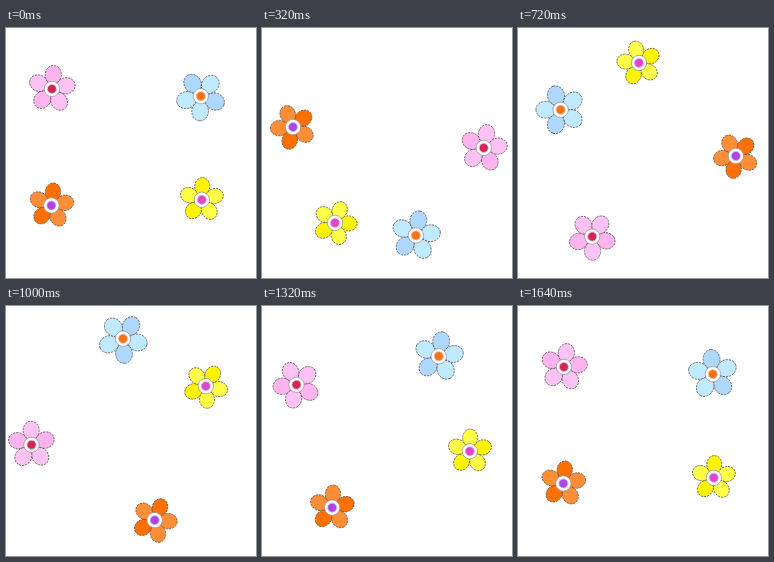
An HTML page with a canvas that plays this animation: 250x250 px, repeating every 1680 ms.

```html
<!DOCTYPE html>
<html>
<head>
<meta charset="utf-8">
<style>
  html, body { margin: 0; width: 100%; height: 100%; overflow: hidden; background: #fff; }
  canvas { display: block; width: 250px; height: 250px; }
</style>
</head>
<body>
<canvas id="stage" width="250" height="250"></canvas>
<script>
const ctx = document.getElementById('stage').getContext('2d');
const STEP = 40, STEPS = 42, LAST = STEPS - 1;
const CENTER = { x: 123, y: 122.7 };
const KEYS = [8, 14, 18, 25, 33, LAST];

// home: resting angle on the orbit; left: degrees still to travel at each key;
// start: step at which the flower sets off; tilt: petal angle added to the spin;
// petal: distance from the middle, half length, half width.
const flowers = [
  { home: 218.7, orbit: 98.8, start: 0, left: [220.3, 139.7, 99.1, 48.1, 12.3, 0],
    tilt: [-87, -74, -65, -59, -53, -36, -11], petal: [14.3, 9.3, 8.1],
    light: '#ffc2f4', dark: '#ffb4f0', dot: '#d62458' },
  { home: -37.2, orbit: 90.2, start: 2.2, left: [252.8, 161.8, 115.8, 56.6, 16.2, 0],
    tilt: [-86, -75, -62, -55, -43, -31, -58], petal: [15, 9.7, 8.4],
    light: '#c0eaff', dark: '#aed8ff', dot: '#ff7010' },
  { home: 34, orbit: 87.8, start: 3.2, left: [269.3, 173.8, 125.3, 63, 19.1, 0],
    tilt: [94, 97, 101, 105, 107, 109, 94], petal: [13.4, 8.8, 7.5],
    light: '#ffff48', dark: '#fff400', dot: '#e044d0' },
  { home: 144.8, orbit: 95, start: 5.7, left: [310.4, 196.9, 141.6, 70.5, 21, 0],
    tilt: [-12, -15, -14, -4, -5, 2, -13], petal: [13.7, 8.9, 7.7],
    light: '#ff8e36', dark: '#ff7000', dot: '#b044ea' }
];

const rad = deg => deg * Math.PI / 180;

function lerpKeys(times, values, t) {
  if (t <= times[0]) return values[0];
  const i = times.findIndex(k => k >= t);
  const u = (t - times[i - 1]) / (times[i] - times[i - 1]);
  return values[i - 1] + (values[i] - values[i - 1]) * u;
}

function ellipse(x, y, rx, ry, fill, stroke) {
  ctx.beginPath();
  ctx.ellipse(x, y, rx, ry, 0, 0, 2 * Math.PI);
  ctx.fillStyle = fill;
  ctx.fill();
  ctx.strokeStyle = stroke;
  ctx.stroke();
}

function drawFlower(f, step) {
  // Roots of the remaining angle fall linearly: a quadratic ease-out.
  const roots = [360, ...f.left].map(Math.sqrt);
  const angle = f.home - lerpKeys([f.start, ...KEYS], roots, step) ** 2;
  const spin = 720 * step / LAST + lerpKeys([0, ...KEYS], f.tilt, step);
  const [distance, length, width] = f.petal;

  ctx.save();
  ctx.translate(CENTER.x + f.orbit * Math.cos(rad(angle)),
                CENTER.y + f.orbit * Math.sin(rad(angle)));
  ctx.rotate(rad(angle + spin));
  ctx.lineWidth = 0.7;
  ctx.setLineDash([2.2, 1]);
  for (let k = 0; k < 5; k++) {
    ellipse(distance, 0, length, width, k === 0 || k === 2 ? f.dark : f.light, '#4a4046');
    ctx.rotate(rad(72));
  }
  ctx.setLineDash([]);
  ellipse(0, 0, 7.7, 7.7, '#fff', '#9a9098');
  ellipse(0, 0, 4.5, 4.5, f.dot, '#c8bcc4');
  ctx.restore();
}

function render() {
  const step = Math.floor(performance.now() / STEP) % STEPS;
  ctx.clearRect(0, 0, 250, 250);
  flowers.forEach(f => drawFlower(f, step));
  requestAnimationFrame(render);
}
render();
</script>
</body>
</html>
```
